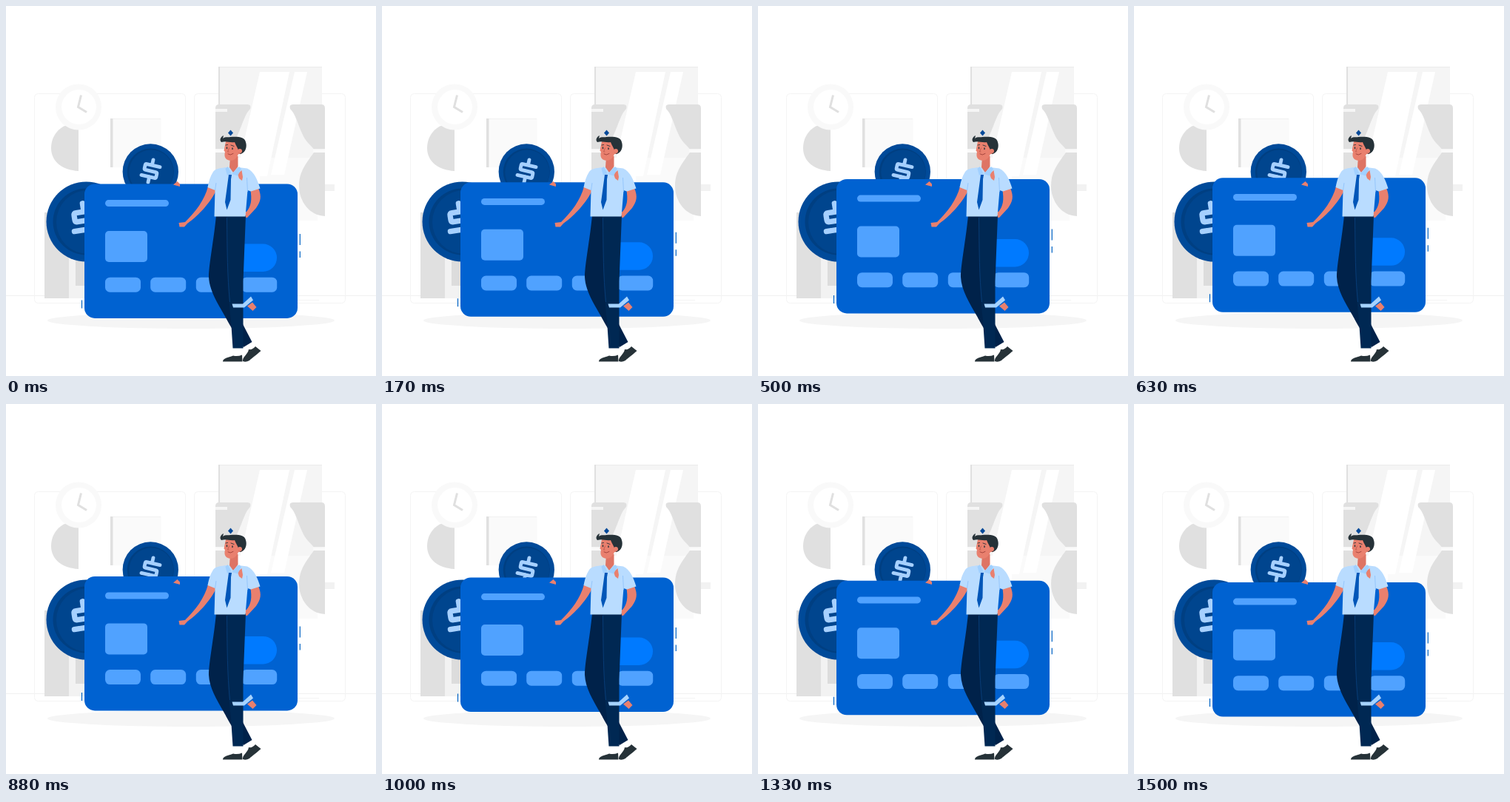
Write an HTML page that moves like this. It is 500x500 px and loops after 1540 ms.

```html
<!DOCTYPE html>
<html lang="en">
<head>
<meta charset="utf-8">
<title>Card and coins</title>
<style>
  html, body { margin: 0; width: 100%; height: 100%; overflow: hidden; background: #fff; }
  svg { display: block; width: 100%; height: 100%; }
</style>
</head>
<body>
<svg viewBox="0 0 500 500">
  <defs>
    <g id="curtain" fill="#e0e0e0">
      <path d="M388 133H426Q431 133 431 138V193.500H416C411 187 405 184 400 172C393 156 391 146 384 139Q382 133 388 133Z"/>
      <path d="M416 198H431V284C410 283 396 264 396 243C396 223 407 211 416 198Z"/>
      <path d="M415 193.500H431V198H415Z" fill="#fafafa"/>
    </g>
    <g id="dollar" fill="none" stroke="#a6d0ff" stroke-width="4.800" stroke-linecap="round" stroke-linejoin="round">
      <path d="M11-8H-7Q-9-8-9-6V-2Q-9 0-7 0H7Q9 0 9 2V6Q9 8 7 8H-11M0-15.500V-8M0 8V15.500"/>
    </g>
  </defs>

  <!-- room -->
  <path d="M0 391.500H500" stroke="#f0f0f0"/>
  <g fill="none" stroke="#f4f4f4">
    <rect x="38.500" y="118.500" width="204" height="283" rx="5"/>
    <rect x="254.500" y="118.500" width="204" height="283" rx="5"/>
    <path d="M394 397.500H423"/>
  </g>
  <path d="M61 192C61 175 73 160 90 160H98V223C76 222 61 210 61 192Z" fill="#e0e0e0"/>
  <circle cx="98" cy="136.500" r="31" fill="#f9f9f9"/>
  <circle cx="98.500" cy="136.500" r="23.500" fill="#fff"/>
  <path d="M101.500 120.500L97.500 136.500L109 143.500" fill="none" stroke="#e0e0e0" stroke-width="3"/>
  <path d="M141 152H209.500V218H141Z" fill="#fafafa"/>
  <path d="M141 152.500H209" stroke="#f0f0f0"/>
  <path d="M141 152H144.500V218H141Z" fill="#e0e0e0"/>
  <path d="M52 279H85V395H52Z" fill="#e0e0e0"/>
  <path d="M85 340H106V395H85Z" fill="#f2f2f2"/>
  <path d="M94 340H106V378H94Z" fill="#dcdcdc"/>

  <!-- window -->
  <path d="M343 190H421V290H343Z" fill="#fafafa"/>
  <path d="M287 82H427V205H287Z" fill="#f5f5f5"/>
  <path d="M287 82.500H427" stroke="#ebebeb"/>
  <path d="M287 82H289V134H287Z" fill="#e0e0e0"/>
  <path d="M343 89H383L353 230H311ZM390 89H407L376 228H358Z" fill="#fff"/>
  <path d="M431 241H444V250H431Z" fill="#f2f2f2"/>
  <use href="#curtain"/>
  <use href="#curtain" transform="matrix(-1 0 0 1 714 0)"/>
  <path d="M283 139H299V143H283Z" fill="#f5f5f5"/>

  <ellipse cx="250" cy="425" rx="194" ry="11" fill="#f5f5f5"/>

  <!-- coins -->
  <circle cx="195.300" cy="224" r="37.700" fill="#004a99"/>
  <circle cx="195.300" cy="224" r="31.500" fill="#003f82"/>
  <circle cx="196.300" cy="224.500" r="30" fill="#00458e"/>
  <use href="#dollar" transform="translate(195.500 223) rotate(13)"/>
  <circle cx="108.500" cy="291.500" r="54" fill="#004a99"/>
  <circle cx="108.500" cy="291.500" r="45" fill="#003f82"/>
  <circle cx="111" cy="292" r="43" fill="#00458e"/>
  <use href="#dollar" transform="translate(107 290) rotate(-9) scale(1.520)"/>

  <!-- card -->
  <g id="card">
    <rect x="106" y="241" width="288" height="181.500" rx="14" fill="#0062d1"/>
    <g fill="#50a2ff">
      <rect x="134" y="262.600" width="86" height="9" rx="4.500"/>
      <rect x="134" y="304.500" width="57" height="42" rx="5"/>
      <rect x="134" y="367.200" width="48" height="20" rx="6.500"/>
      <rect x="195.200" y="367.200" width="48" height="20" rx="6.500"/>
      <rect x="256.800" y="367.200" width="48" height="20" rx="6.500"/>
      <rect x="318.200" y="367.200" width="48" height="20" rx="6.500"/>
    </g>
    <rect x="290" y="322" width="76" height="37.500" rx="18.700" fill="#007aff"/>
    <path d="M397.300 308.500V323.500M397.300 332V340.500M102.500 398V409" stroke="#0062c4" stroke-width="1.200"/>
  </g>

  <!-- man -->
  <g fill="#e9806e">
    <path d="M226 241.500L231.500 237L235 240.500V244Z"/>
    <path d="M273 244L284 249C278 263 261 283 245 294L241 298.500L234.500 298.500L233.500 293L242 292C256 278 268 263 273 244Z"/>
    <path d="M330 247L341 246C346 258 344 264 338 273L326 286L319 285L319 279L325 278C331 271 333 262 330 247Z"/>
  </g>
  <path d="M307 462H319V474H307ZM320 459L329 455L334 464L326 470Z" fill="#fff"/>
  <g fill="#263238">
    <path d="M293 480.500C293 476 300 475 307 472.500Q313 474 319 471.500L319.500 480.500Z"/>
    <path d="M320 480C319 474 327 471 328 464Q333 465 337 460L344.500 466C338 472 333 475 329 479Q324 482 320 480Z"/>
  </g>
  <path d="M284 283H306L307 365L320 430L332.500 454L321 461L303 432C290 407 275 388 274 366C274 350 281 315 284 283Z" fill="#00224a"/>
  <path d="M298 283H324L320.500 372V462.500H306.500L304 425C300 390 299 350 298 283Z" fill="#002853"/>
  <path d="M298.500 286C299 330 299 365 302.500 400" fill="none" stroke="#0b427f" stroke-width=".8"/>
  <path d="M326 405.500L333 400.500L338.500 407L333.500 412Z" fill="#e9806e"/>
  <path d="M305.500 402.500L320 402.500L331 392.500L334 397.500L322 407.500L307 407.500Z" fill="#a6d3ff"/>

  <path d="M298 218C291 219 284 219 280 224C276 230 274 237 272.500 245L282.500 249L281.500 284.500H323.500L326.500 249L331 250.500L343.500 246.500C340 236 336 224 326 219.500L314 218Z" fill="#b9dcff"/>
  <path d="M326.500 251L325.500 232M282.500 249L284 239" stroke="#8cc1fa" stroke-width=".8"/>
  <path d="M303 203H313.500V217L307 225L302 218Z" fill="#de7464"/>
  <path d="M313 227L318.500 222L320 231L319 236L315 233Z" fill="#e9806e"/>
  <path d="M299.500 217L305 227L299 229L296.500 220ZM315 217L305 227L313 229.500L318 220Z" fill="#a1d0ff"/>
  <path d="M301 228H305L304 234L303.500 262L298.500 275.500L296 265Z" fill="#0056b8"/>

  <path d="M297 183H315L320 193Q321 201 314 200C312 206 307 210 301 208.500C296 207 294.500 203 296 197L294.500 195.500Z" fill="#e9806e"/>
  <path d="M291 184C288 181 290 177 294 175L293 179C297 176 300 178 303 177C313 176 323 177 324 184C326 190 324 198 317 200L314 198C315 193 311 190 309 184C302 185 298 182 291 184Z" fill="#263238"/>
  <circle cx="316" cy="196" r="3" fill="#e9806e"/>
  <g fill="none" stroke="#263238" stroke-width=".9" stroke-linecap="round">
    <path d="M297 188L299.500 187.500M304 188L308 189.500"/>
    <path d="M298.500 191V192.500M306 192V193.500" stroke-width="1.400"/>
    <path d="M300 200Q303 202.500 307 199.500" stroke="#9c3f38"/>
    <path d="M301.500 192L299.500 197H301" stroke="#bd5c50"/>
  </g>
  <path d="M303.500 167.500L307 171.500L303.500 175.500L300 171.500Z" fill="#004a99"/>
</svg>
<script>
  const LOOP = 1540, FPS = 24, STEPS = 37, LIFT = 10;
  const card = document.getElementById('card');

  // linear float up and back, in 24 fps steps
  function draw(ms) {
    const step = Math.floor((ms % LOOP) * FPS / 1000 + 0.1);
    const phase = ((step + 1) / STEPS) % 1;
    const y = -LIFT * (1 - Math.abs(1 - 2 * phase));
    card.setAttribute('transform', `translate(0 ${y.toFixed(3)})`);
  }

  const start = performance.now();
  function tick() {
    draw(performance.now() - start);
    requestAnimationFrame(tick);
  }
  draw(0);
  requestAnimationFrame(tick);
</script>
</body>
</html>
```
